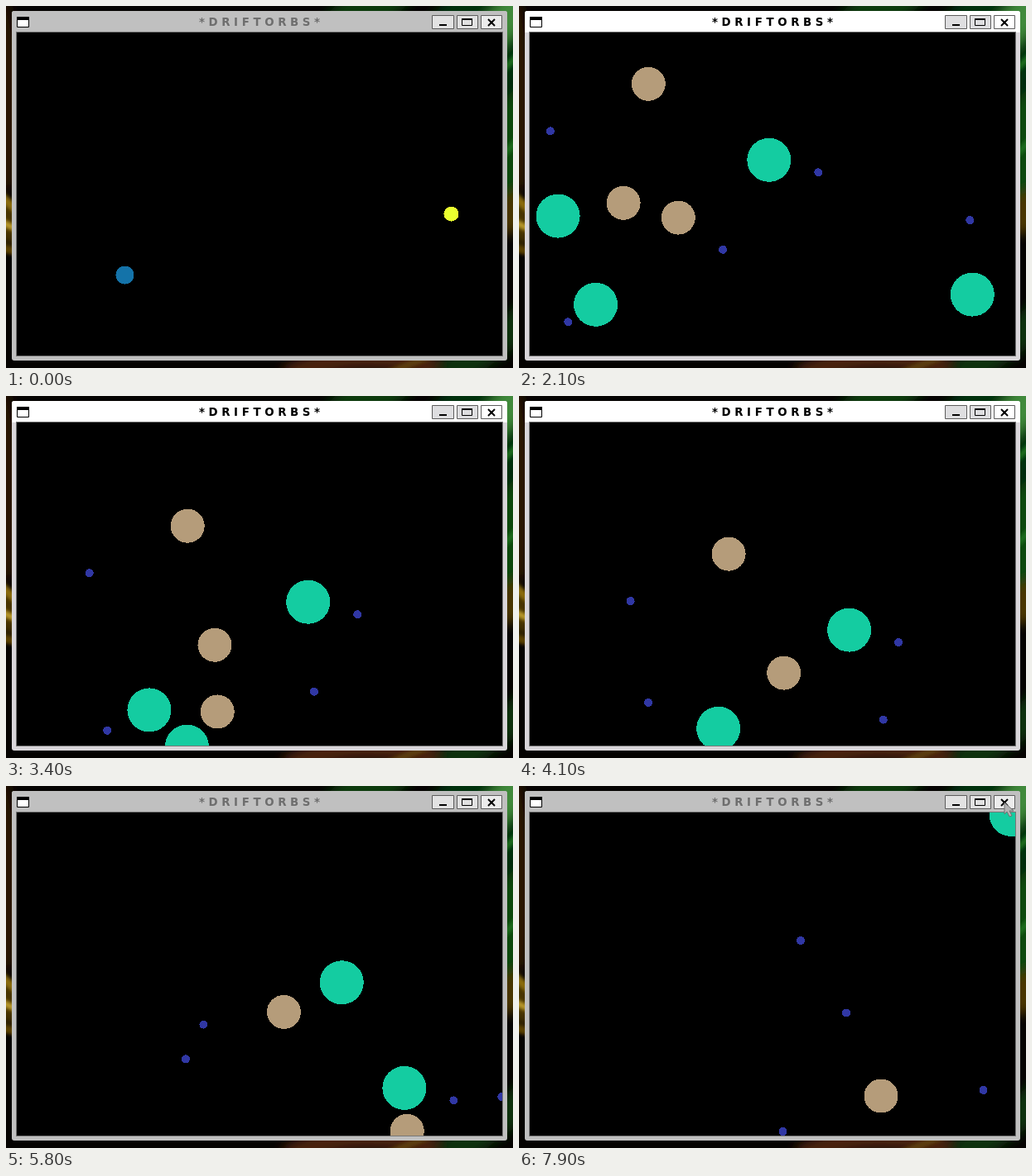
An HTML page that plays this animation: 612 px wide and 438 px high, repeating every 8 s.

```html
<!DOCTYPE html>
<html lang="en">
<head>
<meta charset="utf-8">
<title>Drifting balls</title>
<style>
html, body { margin: 0; width: 100%; height: 100%; overflow: hidden; background: #000; }
svg { display: block; }
#balls { shape-rendering: crispEdges; }
#title { font: bold 13.33px "DejaVu Sans", sans-serif; text-anchor: middle; white-space: pre; }
#win { --bar: #c0c0c0; --edge: #c0c0c0; --ink: #6e6e6e; --close: #ececec; --btn: #e2e2e2; }
#win.active { --bar: #fff; --edge: #d9d6da; --ink: #000; --close: #fff; --btn: #dedee0; }
.edge { fill: var(--edge); }
.bar { fill: var(--bar); }
#title { fill: var(--ink); }
.btn { fill: var(--btn); stroke: #5c5c5c; }
.close { fill: var(--close); }
</style>
</head>
<body>
<svg width="612" height="438" viewBox="0 0 612 438">
  <defs>
    <filter id="soft" x="-20%" y="-20%" width="140%" height="140%"><feGaussianBlur stdDeviation="7"/></filter>
    <filter id="fine" x="-20%" y="-20%" width="140%" height="140%"><feGaussianBlur stdDeviation="2"/></filter>
  </defs>

  <rect width="612" height="438" fill="#050301"/>
  <g fill="none" filter="url(#soft)">
    <path d="M-20 -10Q10 90 -10 220" stroke="#2c1204" stroke-width="40"/>
    <path d="M330 300Q480 130 640 -20" stroke="#06300a" stroke-width="130"/>
    <path d="M400 40L470 -30" stroke="#0b3a0c" stroke-width="60"/>
    <path d="M470 330Q560 200 650 130" stroke="#0b4a10" stroke-width="90"/>
    <path d="M540 80L650 -30" stroke="#3f8a3a" stroke-width="40"/>
    <path d="M-20 250Q60 300 240 310T640 240" stroke="#4a3404" stroke-width="46"/>
    <path d="M340 450Q420 405 520 440" stroke="#4a2008" stroke-width="30"/>
    <path d="M530 450L640 370" stroke="#0e3208" stroke-width="40"/>
  </g>
  <g fill="none" filter="url(#fine)">
    <path d="M-10 225Q20 262 90 280" stroke="#8a6c10" stroke-width="10"/>
    <path d="M-10 258Q20 280 120 290" stroke="#b8982c" stroke-width="8"/>
    <path d="M-10 290Q20 304 100 306" stroke="#5c4206" stroke-width="10"/>
    <path d="M520 150L640 40M560 220L640 140" stroke="#1c6a1c" stroke-width="8"/>
    <path d="M460 445L520 420" stroke="#5c3c0a" stroke-width="8"/>
  </g>

  <g id="win">
    <rect class="edge" x="7" y="6" width="598" height="423" rx="3"/>
    <path class="bar" d="M7 32V9q0-3 3-3h592q3 0 3 3v23z"/>
    <path d="M13.5 13.5h14v12h-14z" fill="#fff" stroke="#000"/>
    <path d="M13 13h15v4h-15z"/>
    <text id="title" x="306" y="24">* D R I F T O R B S *</text>
    <path class="btn" d="M514.5 11.5h26v16h-26zM544.5 11.5h25v16h-25z"/>
    <path class="btn close" d="M573.5 11.5h25v16h-25z"/>
    <path d="M523 22h9v2h-9z"/>
    <path d="M550.5 15.5h12v8h-12z" fill="none" stroke="#000"/>
    <path d="M550 15h13v2h-13z"/>
    <path d="M582 16l8 8m0-8l-8 8" stroke="#000" stroke-width="2"/>
    <rect x="12.5" y="31.5" width="587" height="392" stroke="#777"/>
    <svg x="13" y="32" width="586" height="391" viewBox="13 32 586 391">
      <g id="balls" transform="translate(.5 .5)"/>
    </svg>
  </g>

  <path id="arrow" d="M0 0v14l3-3 3 6 3-1-3-6h5z" fill="#b5b5b5" stroke="#707070"/>
  <path id="resize" d="M587 45h11m-5-5l5 5-5 5m9.500-12v14" fill="none" stroke="#8a8a8a" stroke-width="1.5"/>
</svg>
<script>
const $ = id => document.getElementById(id);
const RIGHT = 600.8, BOTTOM = 424.5;
const CLOSED = 18, REOPENED = 21;   // times are in ticks of 100 ms

const kinds = {
  blue: [11, '#1473a9'], yellow: [9, '#eaff2f'],
  tan: [20.5, '#b59c7a'], teal: [26.5, '#14cca1'], dot: [5, '#3037a4']
};
// kind, x, y, horizontal and vertical speed factor, tick of collision
const firstRun = [
  ['blue', 143, 325, 2, -1],
  ['yellow', 537, 251, 2, -1]
];
const secondRun = [
  ['tan', 180, 118, 1, 1],
  ['tan', 174, 262, 2, 1, 61],
  ['tan', 216, 304, 1, 2, 35],
  ['teal', 325.5, 210, 1, 1, 61],
  ['teal', 95, 302, 2, 2],
  ['teal', 140.5, 385, 2, 1, 35],
  ['teal', 571, 397, 1, 2, 33],
  ['dot', 61.5, 175, 1, 1],
  ['dot', 385, 225, 1, 1],
  ['dot', 294, 318.5, 2, 1],
  ['dot', 568, 307, 1, 2, 33],
  ['dot', 83, 406, 1, 1]
];

const bounce = (p, max) => p > max ? 2 * max - p : p;
const show = (el, on) => el.setAttribute('visibility', on ? 'inherit' : 'hidden');

function makeRun(list, from, to, origin, speed) {
  return list.map(([kind, x, y, dx, dy, end = to]) => {
    const el = document.createElementNS('http://www.w3.org/2000/svg', 'circle');
    const [r, fill] = kinds[kind];
    el.setAttribute('r', r);
    el.setAttribute('fill', fill);
    $('balls').append(el);
    return tick => {
      const d = (tick - origin) * speed;
      show(el, tick >= from && tick < end);
      el.setAttribute('cx', bounce(x + dx * d, RIGHT));
      el.setAttribute('cy', bounce(y + dy * d, BOTTOM));
    };
  });
}
const balls = [
  ...makeRun(firstRun, 0, CLOSED, 0, 4.647),
  ...makeRun(secondRun, REOPENED, 80, 26, 4.84)
];

function pointer(tick) {
  if (tick >= 15 && tick < 18) return [580, 20 + (17 - tick) * 10];
  if (tick === 18) return [585, 20];
  if (tick > 18 && tick < REOPENED) return [585, 46];
  if (tick >= 69) return [586, 20 + Math.max(0, 74 - tick) * 3];
}

function frame() {
  const tick = Math.floor(performance.now() % 8000 / 100);
  show($('win'), tick < CLOSED || tick >= REOPENED);
  $('win').setAttribute('class', tick >= 17 && tick < 47 ? 'active' : '');
  balls.forEach(move => move(tick));

  const at = pointer(tick);
  show($('arrow'), at);
  if (at) $('arrow').setAttribute('transform', `translate(${at})`);
  show($('resize'), tick === 68);
  requestAnimationFrame(frame);
}
frame();
</script>
</body>
</html>
```
